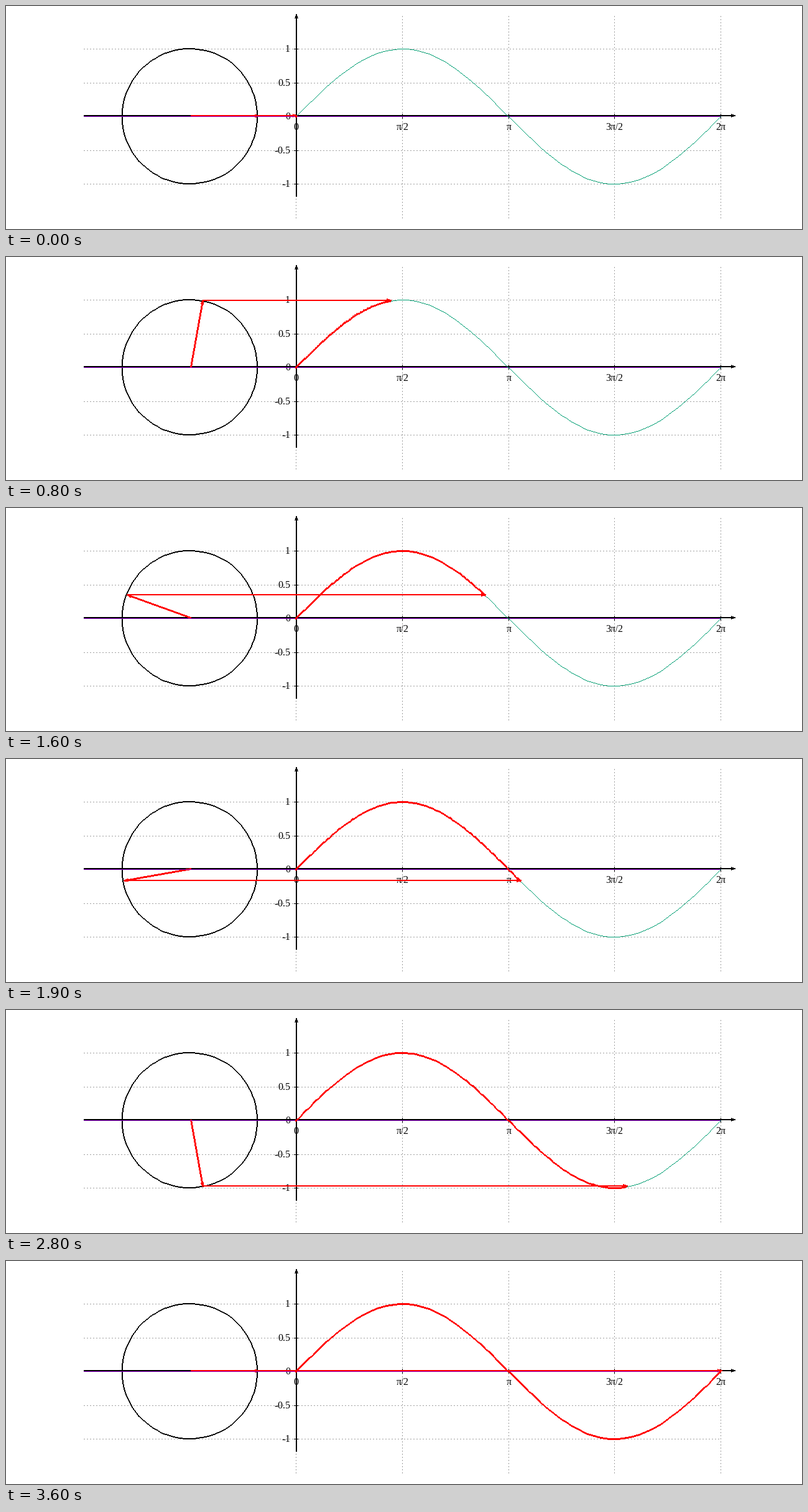
Animation, 1280 px wide and 360 px high, one loop 3.7 s. Source, as a matplotlib script:

```python
import numpy as np
import matplotlib.pyplot as plt
from matplotlib.animation import FuncAnimation
from matplotlib.collections import PolyCollection
from matplotlib.patches import Polygon

W, H, DPI = 1280, 360, 100
FRAMES, INTERVAL = 37, 100
PX = 72 / DPI                      # one pixel in points
X0, Y0 = 466.2, 178.0              # plot origin in pixels
TURN = 683.0                       # width of one period
RX, RY = TURN / (2 * np.pi), 109.0
HUB = np.array([297.0, 177.0])     # where the rotating radius starts
RED, PURPLE, GREEN, GREY = "#ff0000", "#9400d3", "#009e73", "#a0a0a0"

plt.rcParams.update({"path.snap": False, "font.family": "Liberation Serif",
                     "text.hinting": "default", "text.hinting_factor": 1})

fig = plt.figure(figsize=(W / DPI, H / DPI), dpi=DPI, facecolor="white")
ax = fig.add_axes([0, 0, 1, 1])
ax.set_xlim(0, W)
ax.set_ylim(H, 0)
ax.axis("off")


def to_pixel(v):
    return np.floor(np.asarray(v, float) + 0.5)


def raster(points, width=1, dotted=False):
    """Hard-edged polyline as pixel boxes: one run across the line per step."""
    points = to_pixel(points)
    boxes = []
    for start, stop in zip(points[:-1], points[1:]):
        delta = np.abs(stop - start)
        main = 0 if delta[0] >= delta[1] else 1
        steps = int(delta[main])
        if not steps:
            continue
        run = int(width * np.hypot(*delta) / steps)
        index = np.arange(steps + 1)
        low = to_pixel(start + np.outer(index / steps, stop - start))
        if dotted:
            low = low[index % 5 < 2]
        low[:, 1 - main] -= run // 2
        size = np.ones(2)
        size[1 - main] = run
        corners = np.array([(0, 0), (1, 0), (1, 1), (0, 1)]) * size
        boxes.append(low[:, None, :] + corners)
    return np.concatenate(boxes) if boxes else []


def stroke(points, color, width, z, dotted=False):
    boxes = PolyCollection(raster(points, width, dotted), facecolors=color,
                           edgecolors="none", linewidths=0, zorder=z)
    return ax.add_collection(boxes, autolim=False)


def head_points(tip, direction, length=7, half=2.2):
    d = np.asarray(direction, float)
    d = d / np.hypot(*d)
    side = np.array([-d[1], d[0]]) * half
    back = np.asarray(tip) - d * length
    return np.array([tip, back + side, back - side])


def head(color, z, points):
    return ax.add_patch(Polygon(points, closed=True, fc=color, ec="none",
                                zorder=z, antialiased=False))


def sine(end):
    t = np.linspace(0, end, 100)
    return np.column_stack([X0 + RX * t, Y0 - RY * np.sin(t)])


# Dotted grid, ticks and labels
for value in (1, 0.5, 0, -0.5, -1):
    y = to_pixel(Y0 - RY * value)
    stroke([(125, y), (1149, y)], GREY, 1, 0, dotted=True)
    stroke([(463, y), (469, y)], "black", 1, 2)
    ax.text(457, y + 5, f"{value:g}", fontsize=16 * PX,
            ha="right", va="baseline", zorder=1)

for i, label in enumerate(("0", "π/2", "π", "3π/2", "2π")):
    x = to_pixel(X0 + TURN * i / 4)
    stroke([(x, 342), (x, 16)], GREY, 1, 0, dotted=True)
    stroke([(x, 174), (x, 181)], "black", 1, 2)
    ax.text(x + 0.5, 200, label, fontsize=16 * PX, ha="center", va="baseline", zorder=1)

# Axes
stroke([(125, 177), (1168, 177)], "black", 2, 2)
stroke([(467, 17), (467, 307)], "black", 2, 2)
head("black", 2, head_points((1173, 177), (1, 0)))
head("black", 2, head_points((467, 13), (0, -1)))

# Unit circle, zero line and full sine
a = np.linspace(0, 2 * np.pi, 100)
stroke(np.column_stack([X0 - TURN / 4 + RX * np.cos(a), Y0 - RY * np.sin(a)]),
       "black", 2, 3)
stroke([(125, 178), (1149, 178)], PURPLE, 1, 5)
stroke(sine(2 * np.pi), GREEN, 1, 5)

# Moving parts
radius = stroke([HUB, HUB], RED, 3, 4)
level = stroke([HUB, HUB], RED, 2, 4)
radius_head = head(RED, 4, np.zeros((3, 2)))
level_head = head(RED, 4, np.zeros((3, 2)))
trace = stroke([HUB, HUB], RED, 3, 6)
stroke([(465, 178), (467, 178)], RED, 3, 6)


def update(frame):
    angle = np.radians(10 * frame)
    spoke = np.array([np.cos(angle), -np.sin(angle)])
    tip = HUB + spoke * (RX, RY)
    y = to_pixel(tip[1])
    end = X0 + 1 + TURN * frame / 36

    radius.set_verts(raster([HUB, tip], 3))
    radius_head.set_xy(head_points(tip + 0.5 + spoke, spoke))
    level.set_verts(raster([(tip[0], y), (end, y)], 2))
    level_head.set_xy(head_points((end + 1, y), (1, 0)))
    trace.set_verts(raster(sine(angle), 3))
    return radius, level, radius_head, level_head, trace


anim = FuncAnimation(fig, update, frames=FRAMES, interval=INTERVAL, repeat=True, blit=False)
plt.show()
```
